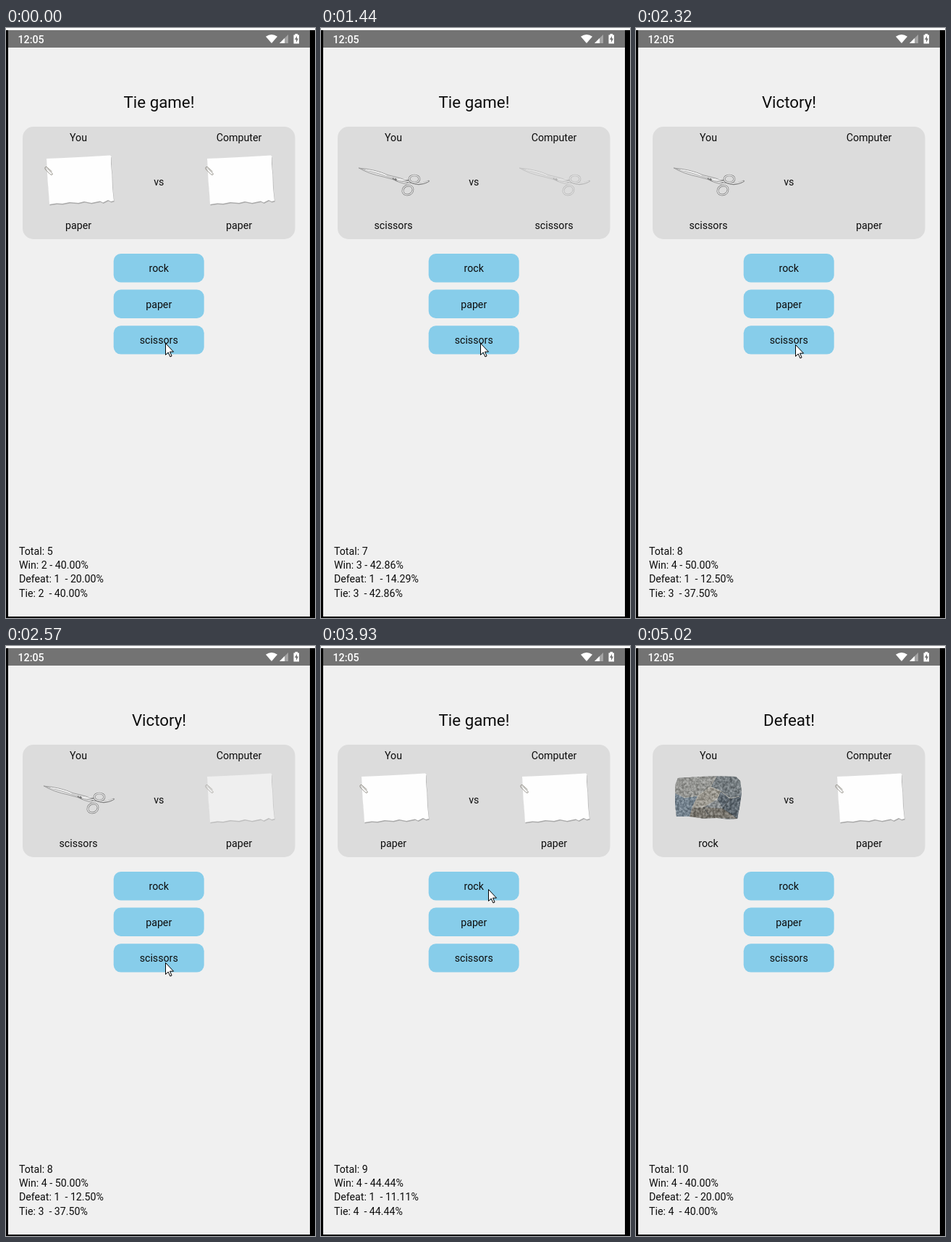
An HTML page that plays this animation: 427x813 px, repeating every 5290 ms.

```html
<!DOCTYPE html>
<html lang="en">
<head>
<meta charset="utf-8">
<title>Rock paper scissors</title>
<style>
  html, body { margin: 0; width: 100%; height: 100%; overflow: hidden; background: #fff; }
  svg { display: block; width: 100%; height: 100%; }
  text { font: 14.2px Roboto, sans-serif; fill: #0c0c0c; white-space: pre; }
  .mid text { text-anchor: middle; }
  .mid #title { font-size: 22.3px; }
  #clock { font-weight: 500; fill: #fff; }
</style>
</head>
<body>
<svg viewBox="0 0 427 813">
  <defs>
    <filter id="grain" x="0" y="0" width="100%" height="100%" color-interpolation-filters="sRGB">
      <feTurbulence type="fractalNoise" baseFrequency=".3" numOctaves="3" seed="4"/>
      <feColorMatrix values=".9 0 0 0 .05  .9 0 0 0 .05  .9 0 0 0 .05  0 0 0 0 1"/>
      <feComposite in2="SourceGraphic" operator="in" result="noise"/>
      <feBlend in="SourceGraphic" in2="noise" mode="soft-light"/>
      <feBlend in="noise" mode="overlay" result="mixed"/>
      <feComposite in="mixed" in2="SourceGraphic" operator="arithmetic" k2=".35" k3=".65"/>
    </filter>

    <path id="sheet" d="M56 180 80 179 110 177.5 144 175.5 145.5 177 145 188 146.5 203 147 220 149 238 145 239 141 237 134 240.5 130 238.5 125 239.5 118 241 108 239 100 241 88 240 78 242 70 241.5 60 243 59 228 57.5 210Z"/>
    <g id="paper">
      <use href="#sheet" x=".6" y="1.5" fill="#aaa"/>
      <use href="#sheet" fill="#fefefe"/>
      <path d="M57 193.500 63 199.500Q65 201 64 202T61 201.500L54.500 195Q53 192.500 54.500 191.500T58 193L63.500 198" fill="none" stroke="#8d8981" stroke-width=".9"/>
    </g>

    <g id="scissors" stroke-linecap="round" stroke-linejoin="round">
      <path d="M52.500 193Q76 195 92 202.500L110 207Q118 209 122 212L117 215Q107 213 99 208.500L86 205Q66 201 52.500 193Z" fill="#e4e4e4" stroke="#8b8b8b" stroke-width=".8"/>
      <path d="M55 194Q78 200 101 207.500" fill="none" stroke="#a5a5a5" stroke-width=".8"/>
      <path d="M62 195.500Q78 197 90 203" fill="none" stroke="#fafafa" stroke-width="1.200"/>
      <path d="M100 207.500Q113 211 121 208.500M104 209.500Q120 211 131 214.500 140 216 148.500 211" fill="none" stroke="#777" stroke-width="2.600"/>
      <path d="M101 207Q113 210 121 208M105 209.500Q120 211 131 214 140 215.500 148 211" fill="none" stroke="#efefef" stroke-width="1.300"/>
      <g fill="none">
        <g stroke="#777" stroke-width="2.700">
          <ellipse cx="129" cy="208" rx="7" ry="5"/>
          <ellipse cx="120" cy="223.500" rx="7.300" ry="6.200" transform="rotate(-28 120 223.500)"/>
        </g>
        <g stroke="#ececec" stroke-width="1.300">
          <ellipse cx="129" cy="208" rx="7" ry="5"/>
          <ellipse cx="120" cy="223.500" rx="7.300" ry="6.200" transform="rotate(-28 120 223.500)"/>
        </g>
      </g>
      <circle cx="103" cy="208.500" r="1.500" fill="#777"/>
    </g>

    <g id="rock" filter="url(#grain)">
      <path d="M58 182 74 181 90 180 112 179.500 138 180 144 186 146 200 143 222 140 238 128 239 112 237 92 237.500 78 235 56 235 54 218 55 203 54 192Z" fill="#8b9194"/>
      <path d="M58 182 90 180 112 179.500 103 194 86 206 66 209 54 203 54 192Z" fill="#9a9b97"/>
      <path d="M112 179.500 138 180 144 186 146 203 130 210 117 200 103 194Z" fill="#747d82"/>
      <path d="M117 200 130 210 146 203 143 222 140 238 120 224 112 210Z" fill="#56626c"/>
      <path d="M54 203 66 209 86 206 78 222 74 235 56 235 54 218Z" fill="#718392"/>
      <path d="M86 206 103 194 117 200 112 211 93 222 78 222Z" fill="#a19d92"/>
      <path d="M78 222 93 222 120 224 140 238 112 237 92 237.500 74 235Z" fill="#77736a"/>
      <path d="M110 181 103 194 86 206 78 222 93 222 112 211 117 200 103 194M86 206 66 209M117 200 130 210 143 207" fill="none" stroke="#c1bfb5" stroke-width="1"/>
      <path d="M130 210 120 224 137 235M93 222 101 233" fill="none" stroke="#454b4e" stroke-width="1"/>
    </g>
  </defs>

  <path d="M0 3H427V813H0Z"/>
  <path d="M3 3H420V811H3Z" fill="#f0f0f0"/>
  <path d="M3 3H420V27H3Z" fill="#737373"/>
  <text id="clock" x="16.500" y="20.500">12:05</text>
  <g fill="#fff">
    <path d="M367 21 359 11.800Q367 6 375 11.800Z"/>
    <path d="M390 9V21H378Z" opacity=".35"/>
    <path d="M385 14V21H378Z"/>
    <path d="M399.500 8H403V9.500H405V21.500H397.500V9.500H399.500Z"/>
    <path d="M402 11 399 16H401V20L404 14.500H402Z" fill="#737373"/>
  </g>

  <rect x="23" y="136" width="376.500" height="155" rx="15" fill="#dcdcdc"/>
  <use id="youImage"/>
  <use id="computerImage" x="222"/>
  <g class="mid">
    <text id="title" x="211.500" y="110"/>
    <text x="100" y="156.300">You</text>
    <text x="322" y="156.300">Computer</text>
    <text x="211.300" y="216.500">vs</text>
    <text id="youName" x="100" y="276.700"/>
    <text id="computerName" x="322" y="276.700"/>
    <g id="buttons"></g>
  </g>
  <g id="stats"></g>
  <path id="cursor" d="M.5.5V16.500L4.200 13 6.900 19 9.100 18 6.500 12.200H11.500Z" fill="#fff" stroke="#000"/>
</svg>

<script>
const LOOP = 5290;
const $ = id => document.getElementById(id);

// Moments at which the screen refreshes.
const ticks = [0, 460, 580, 730, 1320, 1440, 1590, 1740, 2020, 2320, 2440, 2570, 2720,
  2840, 2990, 3390, 3510, 3630, 3780, 3930, 4360, 4480, 4630, 4750, 4900, 5020];

// start, fade start, your hand, computer's hand, title, wins, defeats, ties
const rounds = [
  [0, 0, 'paper', 'paper', 'Tie game!', 2, 1, 2],
  [460, 430, 'scissors', 'paper', 'Victory!', 3, 1, 2],
  [1320, 1320, 'scissors', 'scissors', 'Tie game!', 3, 1, 3],
  [2320, 2399, 'scissors', 'paper', 'Victory!', 4, 1, 3],
  [3390, 3321, 'paper', 'paper', 'Tie game!', 4, 1, 4],
  [4360, 4360, 'rock', 'paper', 'Defeat!', 4, 2, 4],
];

// start, x, y
const cursorStops = [
  [0, 220, 434], [2020, 220, 436], [2840, 228, 393], [2990, 228, 384],
  [3390, 229, 364], [3630, 231, 342], [3780, 231, 339], [3930, 231, 335],
  [4360, 234, 345], [4480, 274, 467], [4630, 325, 615], [4750, 371, 764],
  [4900, 405, 794], [5020, 450, 830],
];

$('buttons').innerHTML = ['rock', 'paper', 'scissors'].map((name, i) => {
  const y = 311 + i * 49.6;
  return `<rect x="148.700" y="${y}" width="125" height="39.400" rx="10" fill="#87cdea"/>
    <text x="211.200" y="${y + 25}">${name}</text>`;
}).join('');
$('stats').innerHTML = [0, 1, 2, 3].map(i => `<text x="18" y="${726 + i * 19.2}"/>`).join('');

const lastBefore = (list, time) => list.findLast(([start]) => start <= time);

function showHand(side, hand, changed, fade) {
  $(side + 'Name').textContent = hand;
  $(side + 'Image').setAttribute('href', '#' + hand);
  $(side + 'Image').setAttribute('opacity', changed ? fade : 1);
}

function draw(now) {
  const time = ticks.findLast(t => t <= now % LOOP);
  const round = lastBefore(rounds, time);
  const previous = rounds[rounds.indexOf(round) - 1] || round;
  const [, fadeStart, you, computer, title, win, defeat, tie] = round;
  const fade = Math.min(1, Math.max(0, (time - fadeStart) / 300));

  $('title').textContent = title;
  showHand('you', you, you !== previous[2], fade);
  showHand('computer', computer, computer !== previous[3], fade);

  const total = win + defeat + tie;
  const share = count => (count / total * 100).toFixed(2) + '%';
  [
    `Total: ${total}`,
    `Win: ${win} - ${share(win)}`,
    `Defeat: ${defeat}  - ${share(defeat)}`,
    `Tie: ${tie}  - ${share(tie)}`,
  ].forEach((line, i) => $('stats').children[i].textContent = line);

  const [, x, y] = lastBefore(cursorStops, time);
  $('cursor').setAttribute('transform', `translate(${x} ${y})`);
}

const begin = performance.now();
function frame() {
  draw(performance.now() - begin);
  requestAnimationFrame(frame);
}
frame();
</script>
</body>
</html>
```
